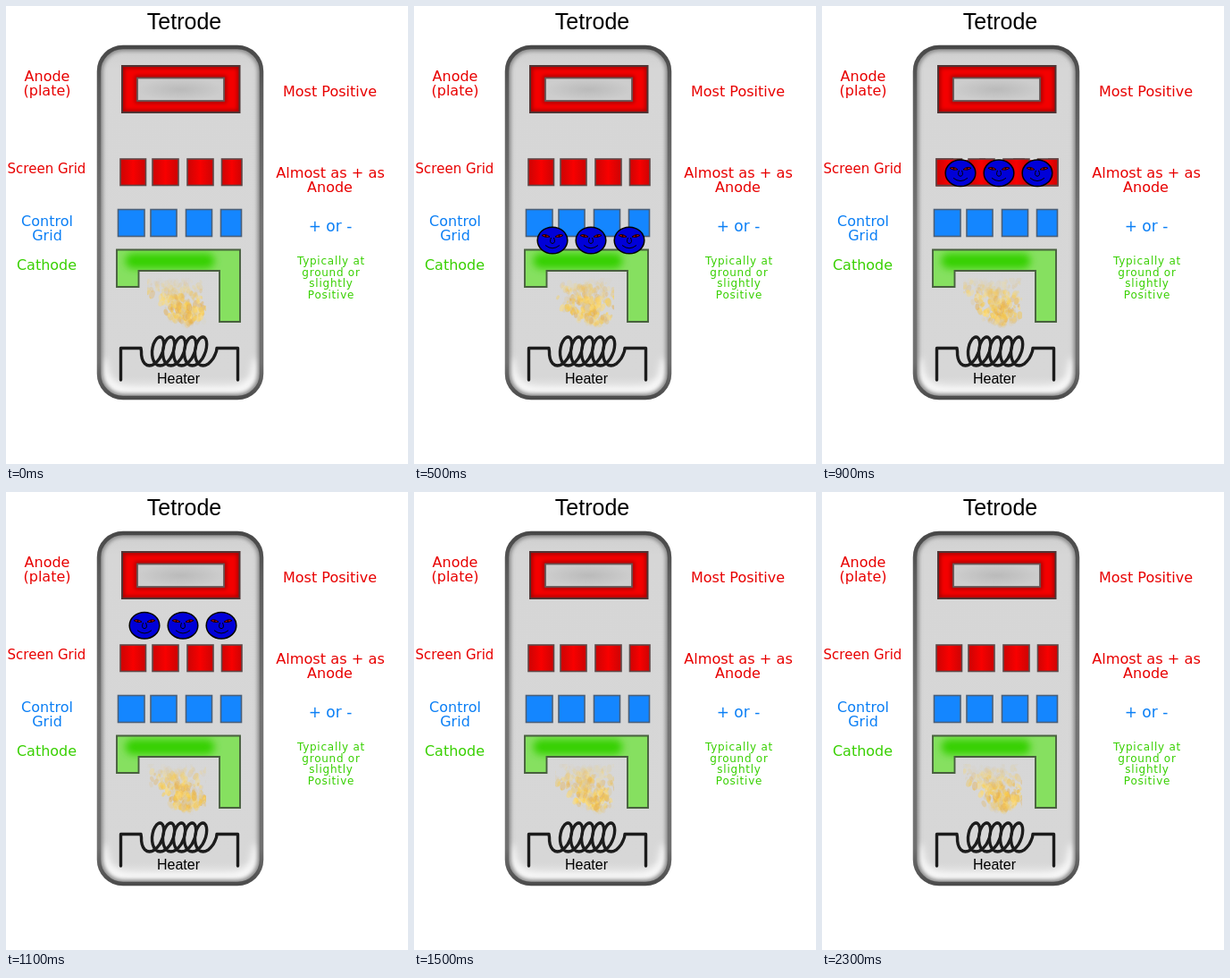
Write an HTML page with a canvas that moves like this. It is 450 px wide and 512 px high and loops after 2400 ms.

```html
<!DOCTYPE html>
<html lang="en">
<head>
<meta charset="utf-8">
<title>Tetrode</title>
<style>
html, body { margin: 0; width: 100%; height: 100%; overflow: hidden; background: #fff; }
svg, canvas { position: absolute; left: 0; top: 0; }
text { text-anchor: middle; font: 16px "DejaVu Sans", Verdana, sans-serif; }
.plain { font-family: "Liberation Sans", Arial, sans-serif; }
.small { font-size: 12px; letter-spacing: .75px; }
.red { fill: #e80000; }
.blue { fill: #0b7ff5; }
.green { fill: #38d000; }
</style>
</head>
<body>
<svg width="450" height="512" viewBox="0 0 450 512">
  <defs>
    <linearGradient id="rim" x2="0" y2="1">
      <stop stop-color="#484848"/><stop offset=".12" stop-color="#5c5c5c"/>
      <stop offset=".5" stop-color="#747474"/><stop offset=".9" stop-color="#707070"/><stop offset="1" stop-color="#4c4c4c"/>
    </linearGradient>
    <linearGradient id="shade" y2="1" x2="0">
      <stop stop-color="#cfcfcf"/><stop offset=".06" stop-color="#d6d6d6"/>
      <stop offset=".94" stop-color="#d7d7d7"/><stop offset="1" stop-color="#eee"/>
    </linearGradient>
    <radialGradient id="hollow">
      <stop stop-color="#bababa"/><stop offset="1" stop-color="#cdcdcd"/>
    </radialGradient>
    <linearGradient id="block">
      <stop stop-color="#cc0404"/><stop offset=".5" stop-color="#f80000"/><stop offset="1" stop-color="#cc0404"/>
    </linearGradient>
    <filter id="soft" filterUnits="userSpaceOnUse" x="90" y="30" width="210" height="420"><feGaussianBlur stdDeviation="4"/></filter>
    <filter id="faint" filterUnits="userSpaceOnUse" x="90" y="30" width="210" height="420"><feGaussianBlur stdDeviation="2"/></filter>
    <clipPath id="inside"><rect x="104" y="46" width="182" height="392" rx="27"/></clipPath>
    <clipPath id="frame"><path clip-rule="evenodd" d="M130 67H262V119H130ZM147 80H244V106H147Z"/></clipPath>
    <path id="elbow" d="M124 272.500H262V353H239V296H148.500V314H124Z"/>
    <clipPath id="bend"><use href="#elbow"/></clipPath>
    <g id="electron" stroke="#000">
      <ellipse rx="16.8" ry="14.8" fill="#0000d8" stroke-width="1.5"/>
      <g id="eye">
        <path d="M-12 -5.500Q-8 -8 -3 -4Q-8 -2.500 -12 -5.500Z" fill="#e00000" stroke-width=".9"/>
        <circle cx="-7.500" cy="-5" r="1" stroke="none"/>
      </g>
      <use href="#eye" transform="scale(-1 1)"/>
      <path d="M-1.500 -3Q-4 3 0 3.500Q4 3 1.500 -3M-8 5.500Q0 12 8 5.500" fill="none"/>
    </g>
  </defs>

  <rect x="104.500" y="46.500" width="181" height="391" rx="27" fill="url(#shade)"/>
  <g clip-path="url(#inside)" fill="none">
    <path d="M108 395Q109 431 140 431H250Q280 431 281 395" stroke="#fff" stroke-width="8" filter="url(#soft)"/>
    <rect x="104.500" y="46.500" width="181" height="391" rx="27" stroke="#888" stroke-width="8" filter="url(#faint)"/>
  </g>
  <rect x="104" y="46" width="182" height="392" rx="27" fill="none" stroke="url(#rim)" stroke-width="4.500"/>

  <rect x="130" y="67" width="131.500" height="52" fill="#f40000"/>
  <g clip-path="url(#frame)" fill="none" stroke="#a00000" stroke-width="5" filter="url(#faint)">
    <rect x="130" y="67" width="131.500" height="52"/><rect x="147" y="80.500" width="97" height="25.500"/>
  </g>
  <rect x="130" y="67" width="131.500" height="52" fill="none" stroke="#503434" stroke-width="2"/>
  <rect x="147" y="80.500" width="97" height="25.500" fill="url(#hollow)" stroke="#655" stroke-width="1.800"/>

  <g id="bridge" display="none">
    <path d="M128 171H264V201H128Z" fill="#e60000" stroke="#733" stroke-width="1.500"/>
    <path d="M147 171H176M183 171H214M227 171H253" stroke="#ddd" stroke-width="2"/>
  </g>
  <g id="grids" stroke-width="1.600"></g>
  <use href="#elbow" fill="#86e060"/>
  <g clip-path="url(#bend)">
    <path d="M142 285H225" fill="none" stroke="#34d000" stroke-width="17" stroke-linecap="round" filter="url(#soft)"/>
  </g>
  <use href="#elbow" fill="none" stroke="#48603e" stroke-width="1.900"/>
  <path id="heater" fill="none" stroke="#1c1c1c" stroke-width="3.400" stroke-linecap="round" stroke-linejoin="round"/>
  <g id="electrons" display="none">
    <use href="#electron" x="155"/><use href="#electron" x="198"/><use href="#electron" x="241"/>
  </g>
  <g id="labels"></g>
</svg>
<canvas width="450" height="512"></canvas>
<script>
const $ = id => document.getElementById(id);
const TAU = 2 * Math.PI, STEP = 100, STEPS = 24;

// x, baseline, class, text, optional size
$("labels").innerHTML = [
  [199.5, 26, "plain", "Tetrode", 25],
  [193, 422, "plain", "Heater", 16],
  [46, 84, "red", "Anode"], [46, 100, "red", "(plate)"],
  [362.5, 101, "red", "Most Positive"],
  [45.5, 187, "red", "Screen Grid", 15],
  [363, 192, "red", "Almost as + as", 16.2], [362.5, 208, "red", "Anode"],
  [46, 246, "blue", "Control"], [46, 262, "blue", "Grid"],
  [363, 252, "blue", "+ or -", 17],
  [45.5, 295, "green", "Cathode"],
  [364, 289, "green small", "Typically at"], [364, 302, "green small", "ground or"],
  [364, 314, "green small", "slightly"], [364, 327, "green small", "Positive"]
].map(([x, y, cls, text, size]) =>
  `<text x="${x}" y="${y}" class="${cls}"${size ? ` style="font-size:${size}px"` : ""}>${text}</text>`).join("");

const row = (y, h, fill, stroke, spans) => spans.map(([x, w]) =>
  `<rect x="${x}" y="${y}" width="${w}" height="${h}" fill="${fill}" stroke="${stroke}"/>`).join("");
$("grids").innerHTML =
  row(171, 29.5, "url(#block)", "#604848", [[128, 28.5], [164, 29], [203, 29], [241.5, 22.5]]) +
  row(227.5, 30, "#1486ff", "#4a5f78", [[125.5, 29.5], [162, 29], [201.5, 29], [240.5, 23]]);

// The coil is a slanted trochoid between the two leads.
let coil = "M128.5 418V382.5H151";
for (let a = 0; a <= 11 * Math.PI + .01; a += Math.PI / 12) {
  const dy = 16 * Math.sin(a);
  const x = 160.5 + 12 * a / TAU - 9 * Math.cos(a) - dy * .18;
  coil += `L${x.toFixed(1)} ${(386 + dy).toFixed(1)}`;
}
$("heater").setAttribute("d", coil + "L236 382.5H259.5V418");

let seed = 11;
const random = () => (seed = seed * 16807 % 2147483647) / 2147483647;
const colours = ["#fbd04e", "#f2c552", "#e6b050", "#ffdc70", "#dccba8"];
const sparks = Array.from({ length: 300 }, (_, i) => ({
  side: random() + random() - 1, start: random(), turns: 1 + i % 3,
  size: .9 + random() * 2.2, sway: random() * TAU, colour: colours[i % 5]
}));
const ctx = document.querySelector("canvas").getContext("2d");

function drawFlame(step) {
  const loop = step / STEPS;
  ctx.clearRect(150, 296, 80, 70);
  ctx.save();
  ctx.beginPath();
  ctx.rect(158, 304, 66, 58);
  ctx.clip();
  for (const s of sparks) {
    const rise = (s.start + loop * s.turns) % 1;
    const spread = 22 + 14 * Math.sin(rise * Math.PI * .7);
    const lean = 12 * (1 - rise) - 4 * rise + 3 * Math.sin(TAU * (loop * 2 + rise));
    const x = 192 + lean + s.side * spread + 2 * Math.sin(s.sway + TAU * loop * 3);
    const y = 358 - 49 * rise - 7 * Math.abs(s.side);
    ctx.globalAlpha = .5 * Math.min(1, 8 * rise, 1.45 * (1.05 - rise));
    ctx.fillStyle = s.colour;
    ctx.beginPath();
    ctx.ellipse(x, y, s.size, s.size * 1.6, .5 * Math.sin(s.sway + rise * 4), 0, TAU);
    ctx.fill();
  }
  ctx.restore();
}

const show = (id, on) => $(id).setAttribute("display", on ? "inline" : "none");
let last = -1;
function tick() {
  const step = Math.floor(performance.now() / STEP) % STEPS;
  if (step !== last) {
    last = step;
    drawFlame(step);
    // Electrons flash on every other step while they climb.
    show("electrons", step >= 5 && step <= 11 && step % 2);
    $("electrons").setAttribute("transform", `translate(0 ${262 - 18.8 * (step - 5)})`);
    show("bridge", step === 9);
  }
  requestAnimationFrame(tick);
}
tick();
</script>
</body>
</html>
```
